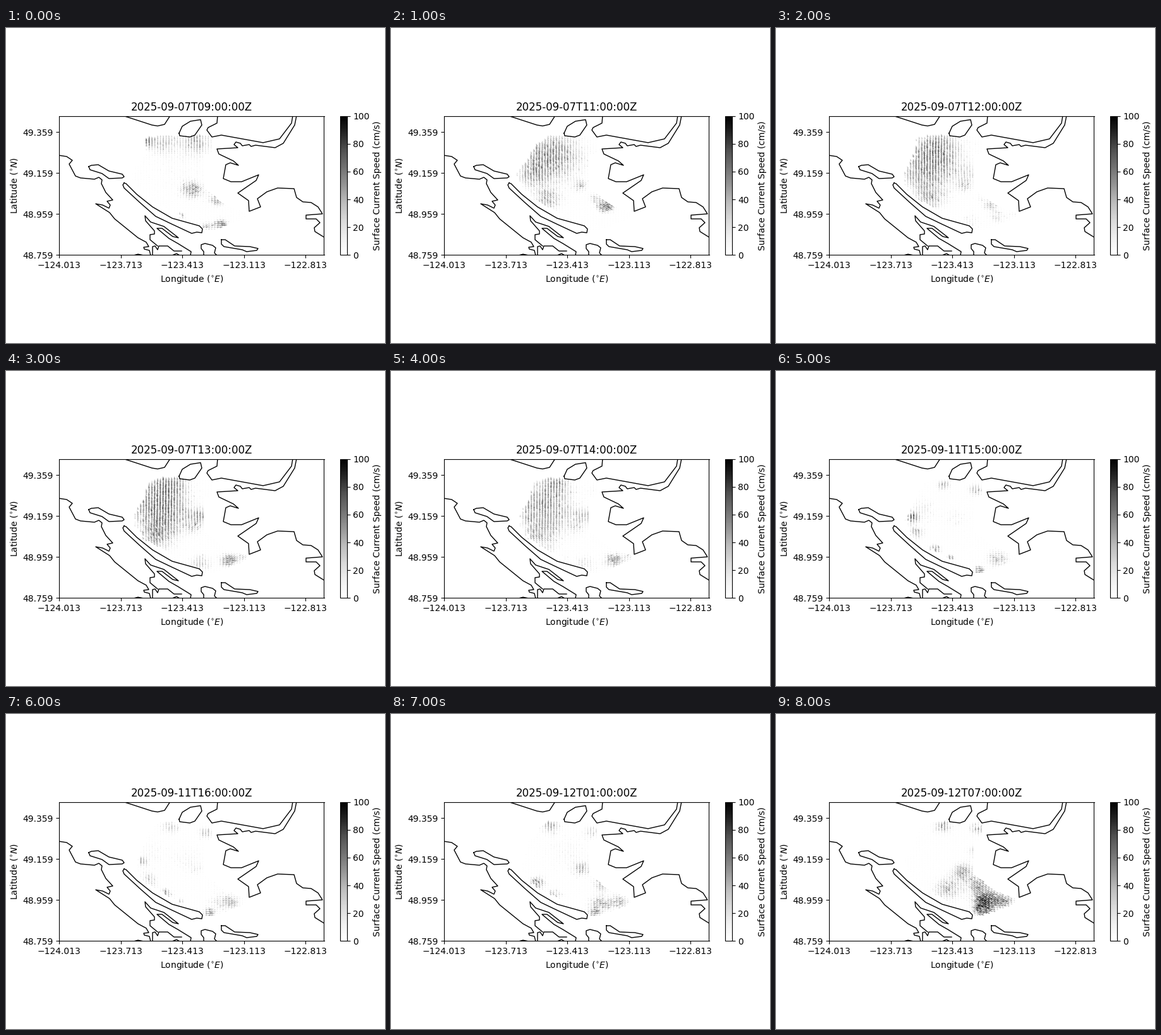
Animation of 600x500 px, one loop 9000 ms. Source, as a matplotlib script:

```python
import numpy as np
import matplotlib.pyplot as plt
from matplotlib.animation import FuncAnimation

W, H = 600, 500
LEFT, BOTTOM, AX_W, AX_H = 84.3, 139.7, 419.2, 220.6
LON0, LAT0, PX_PER_DEG = -124.013, 48.759, 325.0

plt.rcParams["font.family"] = "DejaVu Sans"

fig = plt.figure(figsize=(W / 100, H / 100), dpi=100, facecolor="white")
ax = fig.add_axes([LEFT / W, BOTTOM / H, AX_W / W, AX_H / H])


def to_lon(x):
    return LON0 + (np.asarray(x) - LEFT) / PX_PER_DEG


def to_lat(y):
    return LAT0 + (H - BOTTOM - np.asarray(y)) / PX_PER_DEG


def coast(*points, closed=False):
    xs, ys = zip(*points, *points[:closed])
    ax.plot(to_lon(xs), to_lat(ys), color="black", lw=1)


# Northern shore and inlet
coast((188, 140), (231, 154), (240, 155.5), (251, 153), (260, 139))
coast((274, 167), (279, 156), (292, 148), (308, 145.5), (310, 154),
      (299, 170), (291, 173), (275, 171), closed=True)
coast((335, 139), (334, 151), (320, 158), (318, 162), (326, 173), (341, 170),
      (407, 182), (433, 176), (452, 151), (454, 139))
# Mainland
coast((460, 139), (457, 154), (439, 183), (426, 190), (395, 186), (388, 188),
      (385, 185), (374, 187), (371, 183), (364, 181), (361, 185), (367, 190),
      (334, 192), (337, 200), (360, 211), (368, 218), (355, 214), (348, 217),
      (344, 239), (356, 244), (373, 244), (400, 233), (396, 242), (367, 262),
      (384, 274), (385, 291), (403, 284), (398, 271), (413, 260), (430, 254),
      (456, 255), (460, 269), (470, 276), (483, 277), (494, 284), (501, 295),
      (475, 297), (475, 303), (491, 303), (497, 309), (488, 317), (489, 323),
      (505, 333))
# Large island
coast((83, 202), (96, 204), (105, 210), (100, 216), (110, 235), (118, 238),
      (140, 240), (147, 237), (152, 241), (151, 247), (158, 261), (169, 273),
      (160, 275), (165, 281), (163, 286), (153, 281), (142, 279), (164, 293),
      (172, 303), (209, 333), (222, 340), (226, 347), (218, 348), (219, 351),
      (227, 353), (229, 361))
coast((232, 361), (232, 347), (236, 346), (240, 352), (242, 346), (256, 346),
      (266, 354), (278, 354))
coast((240, 346), (228, 336), (228, 328), (235, 327), (235, 322), (221, 306),
      (220, 298), (229, 308), (250, 315), (273, 333), (264, 331), (247, 318),
      (239, 318), (258, 334), (272, 342), (293, 355), (292, 361))
coast((202, 361), (209, 359), (218, 361))
coast((263, 361), (270, 358), (275, 361))
# Small islands
coast((187, 246), (185, 249), (187, 254), (213, 278), (237, 299), (262, 311),
      (294, 326), (302, 324), (310, 325), (311, 319), (306, 314), (263, 302),
      (232, 284), (207, 264), (190, 247), closed=True)
coast((131, 220), (135, 218), (146, 217), (163, 227), (184, 232), (187, 236),
      (184, 238), (163, 239), (152, 231), (133, 225), closed=True)
coast((313, 361), (313, 355), (309, 350), (309, 344), (315, 342), (327, 345),
      (332, 349), (330, 357), (334, 361))
coast((341, 336), (347, 336), (362, 346), (386, 347), (399, 350), (397, 353),
      (381, 355), (374, 352), (345, 347), (341, 343), closed=True)

# Currents: blobs of (x, y, radius, speed, direction)
MORNING = [(222, 183, 8, 45, 95), (248, 182, 17, 30, 95),
           (302, 183, 18, 36, 92), (270, 225, 38, 10, 100),
           (293, 258, 13, 50, 25), (333, 271, 12, 46, -38),
           (338, 312, 8, 62, 5), (316, 316, 7, 40, 10), (278, 299, 4, 50, 120)]
FLOOD = [(253, 206, 37, 50, 112), (222, 238, 17, 22, 120),
         (248, 275, 17, 36, 128), (298, 251, 9, 42, 15),
         (338, 282, 10, 72, -28), (322, 269, 8, 36, -32)]
PEAK = [(234, 212, 32, 46, 100), (262, 182, 20, 36, 93),
        (240, 264, 22, 40, 132), (270, 232, 26, 22, 105),
        (308, 232, 12, 34, 75), (295, 251, 11, 28, 20),
        (350, 301, 10, 58, 10), (374, 296, 8, 28, 25), (308, 306, 13, 30, 100)]
SLACK = [(216, 236, 6, 62, 90), (228, 222, 17, 22, 85),
         (265, 182, 8, 36, 75), (316, 190, 9, 36, 78), (285, 235, 16, 15, 92),
         (224, 258, 9, 38, 125), (252, 285, 7, 46, 112),
         (277, 298, 4, 55, 120), (320, 316, 6, 60, 0), (350, 298, 13, 42, 8)]
NIGHT = [(252, 179, 11, 38, 92), (318, 188, 9, 26, 80),
         (232, 269, 9, 50, 128), (258, 288, 9, 36, 130), (302, 247, 10, 36, 50),
         (283, 222, 28, 14, 92), (331, 270, 12, 40, -38),
         (328, 302, 13, 42, 15), (320, 316, 6, 44, 0), (360, 299, 12, 38, 12)]
EBB = [(264, 180, 11, 38, 95), (318, 184, 9, 36, 88), (312, 219, 8, 26, 85),
       (298, 250, 14, 42, 150), (272, 279, 18, 38, 142),
       (322, 272, 13, 40, 150), (337, 298, 16, 72, 160),
       (330, 314, 11, 46, 158), (366, 297, 10, 44, 165)]

# Day, hour, western limit near the top and in the middle, weighted flows
STEPS = [
    (7, 9, 222, 198, [(1, MORNING)]),
    (7, 11, 243, 200, [(1, FLOOD)]),
    (7, 12, 225, 203, [(0.5, FLOOD), (0.5, PEAK)]),
    (7, 13, 225, 203, [(1, PEAK)]),
    (7, 14, 225, 203, [(0.75, PEAK), (0.25, SLACK)]),
    (11, 15, 236, 208, [(1, SLACK)]),
    (11, 16, 236, 208, [(0.6, SLACK), (0.4, NIGHT)]),
    (12, 1, 238, 212, [(1, NIGHT)]),
    (12, 7, 232, 203, [(1, EBB)]),
]

gx, gy = np.meshgrid(np.arange(200.2, 386, 4.45), np.arange(173.5, 321, 2.92))
gx, gy = gx.ravel(), gy.ravel()
east = np.interp(gy, [199, 201, 256, 283, 294, 298, 306, 321],
                 [327, 314, 314, 352, 383, 382, 368, 328])


def stamp(i):
    day, hour = STEPS[i][:2]
    return f"2025-09-{day:02d}T{hour:02d}:00:00Z"


def current(i):
    """Velocity on the grid, masked outside the radar coverage."""
    top, mid, flows = STEPS[i][2:]
    rng = np.random.default_rng(40 + i)
    u = rng.normal(0, 2, gx.size)
    v = rng.normal(4, 2, gx.size)
    for weight, blobs in flows:
        for x, y, r, speed, angle in blobs:
            d = ((gx - x) ** 2 + 1.6 * (gy - y) ** 2) / r ** 2
            s = weight * speed * np.exp(-d / 2)
            u += s * np.cos(np.radians(angle))
            v += s * np.sin(np.radians(angle))
    gain = rng.normal(1, 0.12, gx.size)
    west = np.interp(gy, [171, 177, 200, 232, 250, 270, 292, 320],
                     [250, top, 222, mid, 207, 222, 262, 312])
    west += rng.normal(0, 2, gx.size)
    hidden = (gx < west) | (gx > east)
    return np.ma.array(u * gain, mask=hidden), np.ma.array(v * gain, mask=hidden)


u0, v0 = current(0)
arrows = ax.quiver(to_lon(gx), to_lat(gy), u0, v0, np.hypot(u0, v0),
                   cmap="Greys", clim=(0, 100), units="dots", width=1,
                   scale_units="dots", scale=8)

ax.set_xlim(LON0, LON0 + AX_W / PX_PER_DEG)
ax.set_ylim(LAT0, LAT0 + AX_H / PX_PER_DEG)
ax.set_xticks(LON0 + 0.3 * np.arange(5))
ax.set_yticks(LAT0 + 0.2 * np.arange(4))
for axis in (ax.xaxis, ax.yaxis):
    axis.set_major_formatter(lambda t, _: f"{t:.3f}".replace("-", "\u2212"))
ax.set_xlabel(r"Longitude ($^{\circ}E$)")
ax.set_ylabel(r"Latitude ($^{\circ}N$)")
title = ax.set_title(stamp(0))

cax = fig.add_axes([528.5 / W, BOTTOM / H, 11 / W, AX_H / H])
fig.colorbar(arrows, cax=cax, label="Surface Current Speed (cm/s)")


def update(i):
    u, v = current(i)
    arrows.set_UVC(u, v, np.hypot(u, v))
    title.set_text(stamp(i))
    return arrows, title


anim = FuncAnimation(fig, update, frames=len(STEPS), interval=1000,
                     repeat=True, repeat_delay=0, blit=False)
plt.show()
```
